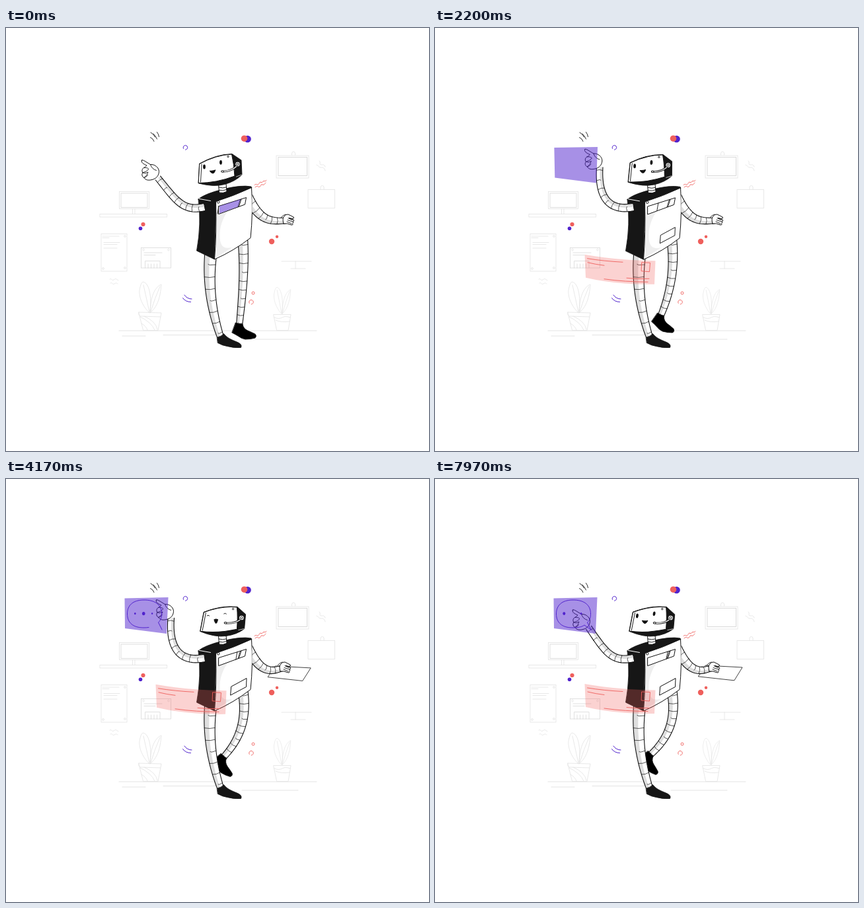
Recreate the animation shown at these times as an HTML page. Size 640 by 640 pixels, loop 8000 ms.

```html
<!DOCTYPE html>
<html lang="en">
<head>
<meta charset="utf-8">
<title>Robot</title>
<style>
  html, body { margin: 0; width: 100%; height: 100%; overflow: hidden; background: #fff; }
  svg { display: block; width: 100vw; height: 100vh; }
  path { stroke-linecap: round; stroke-linejoin: round; }
  .thin { fill: none; stroke: #111; stroke-width: .9; }
  .ink { fill: #fff; stroke: #111; }
  .dark { fill: #161616; stroke: #111; stroke-width: .8; }
  .bg { fill: none; stroke: #e3e3e3; stroke-width: .8; }
  .red { fill: none; stroke: #ef5f5c; stroke-width: .9; }
  .vio { fill: none; stroke: #5123cd; }
  .redFill { fill: #ef5f5c; }
  .vioFill { fill: #5123cd; }
</style>
</head>
<body>
<svg viewBox="0 0 640 640">
  <defs>
    <clipPath id="armClip"><rect x="372.4" y="240" width="90" height="80"/></clipPath>
  </defs>

  <g class="bg">
    <rect x="409" y="193" width="49" height="34"/>
    <rect x="412" y="195.5" width="43.5" height="28" stroke="#d2d2d2"/>
    <path d="M432.5 192v-2a2.5 3 0 0 1 5 0v2M476 244v-3a2.5 2.5 0 0 1 5 0v3"/>
    <rect x="457" y="244.5" width="40.5" height="28"/>
    <path d="M474 201c3 2-1 6 3 6s4-1 6 3M470 207c3 1 3 4 6 4s5-1 7 5"/>
    <rect x="171.5" y="247.5" width="45" height="26"/>
    <rect x="174" y="250" width="40" height="21.5" stroke="#d6d6d6"/>
    <path d="M191.5 274v7.500M195 274v7.500"/>
    <rect x="142" y="281.5" width="101.500" height="4.500"/>
    <rect x="144" y="311.5" width="39" height="56.5"/>
    <path d="M146 315h25M146 317.500h10M148 324.500h24M148 327.500h20M148 333h20"/>
    <rect x="204.5" y="332.5" width="45" height="30.5" stroke="#d9d9d9"/>
    <path d="M209 340h27M209 343.500h17M210.500 363v-10.500h22.500v10.500" stroke="#d9d9d9"/>
    <path id="bars" stroke="#d9d9d9"/>
    <g id="pins"></g>
    <path d="M157 380c3-2 3 3 6 1s3-2 7 1M158 386c3-2 3 3 6 1s3-1 5 0"/>
    <path d="M417 353h45M438 353v11M431 364h22"/>
    <path d="M171 458H470M176 466H211M238 464.500H318M357 471H442" stroke-width="1"/>
    <path id="leaves" d="M216 430c-10-10-17-26-13-38 2-9 5-10 10-4 6 8 7 28 5 42M218 431c0-16 4-38 17-43-1 12-3 32-17 43M208 389q5 22 9 41M233 391q-8 18-14 38"/>
    <use href="#leaves" transform="translate(251 62) scale(.765 .86)"/>
    <path d="M201 430l34 1-5 26.500h-22zM201 430q-1 4 2 6l31 1M203 437q17 8 22 20M209 436q18 8 20 20M205 447q7 4 9 10"/>
    <path d="M405 433.500h26l-4 24h-17zM406 438q7 3 12 0t12 0M408 442q8 4 21 2"/>
  </g>

  <path class="thin" d="M219 158q5 3 6.500 7M218.500 165.500q4 1.500 5.500 6M223 160q4 4 5.500 8M228.500 157.500q2.500 3 3 7"/>
  <circle class="vioFill" cx="365.500" cy="168" r="5.300"/>
  <circle class="redFill" cx="360.500" cy="167.200" r="4.800"/>
  <circle class="redFill" cx="402" cy="323" r="4.200"/>
  <circle class="redFill" cx="410" cy="315.800" r="2.200"/>
  <circle class="redFill" cx="207.500" cy="297" r="3.100"/>
  <circle class="vioFill" cx="203.500" cy="303.200" r="2.800"/>
  <path class="vio" d="M268.500 182.500a3.300 3.300 0 1 1 3 1.700M270 404q4 6 11 6M267.500 408.500q4 6 12 6"/>
  <path class="red" d="M376 237.500c3-3 4 1 6-1s1-4 4-3 2-2 4-2 2 1 4-1M377 241c4-4 4 1 7-1s1-4 4-3 3-1 5-3"/>
  <circle class="red" cx="374" cy="401" r="2"/>
  <path class="red" d="M368.200 416.500a3.300 3.300 0 1 1 3 1.500"/>

  <g id="backLeg"></g>
  <path id="backFoot" class="dark" style="fill:#000" d="M347.500 446q6 2 10.500 2 1 7 8 10 5 2 11 5 3 3 0 6-7 2-15 2-6-1-11-5-5-3-9-5z"/>
  <g id="frontLeg"></g>
  <path class="dark" d="M319.500 468q6-1 10-5.500c6 8 15 10 23 14q5 3 3 7-10 1-21-2-7-1-14-5z"/>

  <g id="body">
    <path class="dark" d="M291 259Q300 251 328 244T371 240L372 242 318 263 315.500 350 288.500 337Q296 296 291 259z"/>
    <path class="ink" d="M317.500 262.500Q345 254 371.500 241.500 374 280 370 317.500 345 337 315.500 350 319 310 317.500 262.500z"/>
    <path fill="#eee" d="M318.500 270L343 268C330 282 324 296 323.500 312 323 330 329 335 342 332L317 348Q320 310 318.500 270z"/>
    <path d="M292.500 258.500l17 3" stroke="#fff" fill="none"/>
    <circle class="ink" cx="321.200" cy="263.300" r="1.800"/>
    <path class="ink" d="M322 269.500L363.500 256.500 361.500 267 322 281.500z"/>
    <path class="thin" d="M356 259l-3.500 11M354.500 259.500l-3.500 11"/>
    <path id="shutter" class="thin"/>
    <path id="slot" class="ink"/>
    <path class="ink" d="M321.500 236l1 13q6 1.500 11.500-1.500l-1-12z"/>
    <path class="thin" d="M322 241q6 2 11.500 0M322.500 245.500q6 1.500 11-1"/>
  </g>

  <path id="paper" class="ink" style="stroke-width:.8"/>
  <g id="rightArm" clip-path="url(#armClip)"></g>
  <g id="rightHand">
    <path class="ink" d="M420 296q-2-7 0-10 3-5 7-4l8 4q2 2-2 2.500l-5-1 7 2.500q2 2-1 2.500 2 2-.5 3 1.500 2.500-1.500 2.500-6-3-12-2z"/>
    <path class="thin" d="M416 287q3-4 7-5M427 287.500l6 3M426 290.500l7.500 2.500M425 293l7 3"/>
  </g>

  <g id="leftArm"></g>
  <g id="leftHand">
    <path class="ink" d="M205.500 200C207 198.500 212 203 218.500 206.500 225 206 231.500 211 231.500 217.500 231 224 227 228 221 229.500 215 231 211 230 209 226.500 205.500 225 205 221 207 219 205 216 206 213 208.500 211.500 211 210.500 212 209 213 208 208 206 203.500 203 205.500 200z"/>
    <path class="thin" d="M218.500 206.500q2 7 9 9M208.500 211.500q5-1 7.500 2-3 4-9 5.500M207 219q4 2 8-1-1 5-6 8.500M209 226.500q4-1 5.500-4"/>
  </g>

  <g id="head">
    <path class="dark" d="M293 205Q318 191 342 190.500L356 200 357 222Q347 232 331 236.500 315 241 291.500 235z"/>
    <path class="ink" d="M293 205.500Q318 192 341.500 191 345 206 346 224 318 234.500 291.500 234.500z"/>
    <path class="thin" d="M296 206l-1.500 27"/>
    <path d="M348.500 225l8-3" stroke="#fff" fill="none" stroke-width=".7"/>
    <circle class="thin" cx="336" cy="194.500" r="1.200"/>
    <circle class="ink" cx="350.500" cy="206" r="3.800"/>
    <circle class="thin" cx="350.500" cy="206" r="1.700"/>
    <path id="mic" d="M348.500 209.500Q342 216 329 217.200" fill="none" stroke="#111" stroke-width="2.800"/>
    <path d="M348.500 209.500Q342 216 329 217.200" fill="none" stroke="#fff" stroke-width="1.300"/>
    <ellipse class="ink" cx="327.500" cy="217" rx="1.900" ry="1.300"/>
    <g id="eyes"></g>
    <path id="lids" class="thin" d="M298.300 210q1.700-2 3.600-.3M323.300 203.600q1.700-2 3.600-.3"/>
    <path id="mouth" fill="#111" stroke="#111"/>
  </g>

  <path id="screen" class="vioFill" fill-opacity=".5"/>
  <path id="bubble" class="vio" pathLength="100" d="M236 228L230.500 217C235 213 235.500 208 235.500 204 235.500 190 225 183 209 183 191 183 183.500 192 183.500 204 183.500 218 193 225 208 225 216 225 222 224 226 221z"/>
  <g id="dots"></g>

  <g id="banner">
    <path class="redFill" fill-opacity=".28" d="M226.500 310Q278 319 333.500 319.500L332 355Q275 356 228 345z"/>
    <path class="red" d="M230.500 316Q255 320 284 321.500M231 322Q243 325 256 326.500M256 347Q288 351.500 322 351.500M290 345.500Q306 347.500 324 346.500M313 322l12.500.5-1 13.500-12-1z"/>
  </g>
</svg>
<script>
const LOOP = 8;
const $ = id => document.getElementById(id);
const set = (node, name, value) => node.setAttribute(name, value);
const show = (id, on) => set($(id), "visibility", on ? "visible" : "hidden");
const span = (t, a, b) => Math.max(0, Math.min(1, (t - a) / (b - a)));
const ease = u => u < .5 ? 4 * u ** 3 : 1 - 4 * (1 - u) ** 3;
const soft = u => .5 - .5 * Math.cos(Math.PI * u);
const out = (u, power) => 1 - (1 - u) ** power;
const pulse = (t, a, b, c, d) => soft(span(t, a, b)) - soft(span(t, c, d));
const mix = (a, b, k) => a.map((v, i) => v + (b[i] - v) * k);
const bend = (a, b, c, k) => mix(mix(a, b, k), mix(b, c, k), k);
const line = pts => "M" + pts.map(p => p.map(n => n.toFixed(2)).join(" ")).join("L");
const quad = q => "M" + q.join(" ") + "Z";
const times = (n, fn) => Array.from({ length: n }, (_, i) => fn(i));

function child(parent, tag, attrs) {
  const node = document.createElementNS("http://www.w3.org/2000/svg", tag);
  for (const k in attrs) set(node, k, attrs[k]);
  return parent.appendChild(node);
}

// Ringed limb along a cubic curve; returns its redraw function.
function limb(id, w0, w1, rings) {
  const g = $(id);
  const fill = child(g, "path", { fill: "#fff" });
  const shade = child(g, "path", { fill: "#dedede" });
  const edge = child(g, "path", { class: "thin", style: "stroke-width:1.1" });
  const ring = child(g, "path", { class: "thin", style: "stroke-width:.7" });
  return c => {
    // Point at u, side from -1 to 1 across the limb, push along it
    const at = (u, side, push = 0) => {
      const v = 1 - u;
      const pos = [0, 1].map(k => v ** 3 * c[k] + 3 * v * v * u * c[k + 2] + 3 * v * u * u * c[k + 4] + u ** 3 * c[k + 6]);
      const dir = [0, 1].map(k => v * v * (c[k + 2] - c[k]) + 2 * v * u * (c[k + 4] - c[k + 2]) + u * u * (c[k + 6] - c[k + 4]));
      const len = Math.hypot(...dir), [dx, dy] = dir.map(d => d / len);
      const w = (w0 + (w1 - w0) * u) / 2 * side;
      return [pos[0] - dy * w + dx * push, pos[1] + dx * w + dy * push];
    };
    const side = s => times(25, i => at(i / 24, s));
    const a = side(1), b = side(-1);
    set(fill, "d", line([...a, ...side(-1).reverse()]) + "Z");
    set(shade, "d", line([...a, ...side(.1).reverse()]) + "Z");
    set(edge, "d", line(a) + line(b));
    set(ring, "d", times(rings, i => {
      const u = (i + .7) / rings;
      return line([at(u, i % 3 ? 1 : .3), at(u, 0, 1), at(u, -1)]);
    }).join(""));
  };
}

// Small repeated parts
set($("bars"), "d", times(4, i => `M${215 + 4.5 * i} 357v6`).join(""));
[[180, 315], [147, 364], [180, 363], [208, 335.5], [246, 335.5]]
  .forEach(([cx, cy]) => child($("pins"), "circle", { cx, cy, r: 1.4 }));
const eyes = times(2, i => child($("eyes"), "ellipse", { cx: 300 + 25 * i, cy: 210 - 6.7 * i, rx: 1.9, fill: "#111" }));
const dots = times(3, i => child($("dots"), "ellipse", { cx: 195.3 + 12.9 * i, cy: 203.6, class: "vioFill" }));

const leftArm = limb("leftArm", 11.5, 9.5, 8);
const rightArm = limb("rightArm", 15, 8.5, 7);
const backLeg = limb("backLeg", 15, 9, 10);
limb("frontLeg", 18, 10, 7)([309.5, 344, 305, 390, 312, 430, 324, 466]);

// Mouth: half width, upper curve, lower curve, drop
const smile = [4.2, 1, 8.5, 0], laugh = [2.8, -1.5, 11, -1.5], flat = [4, 0, .2, -1.5];

function draw(t) {
  // Pointing arm
  const lift = ease(span(t, .5, 2.6)), lower = ease(span(t, 4.3, 5.8));
  const [hx, hy] = mix(mix([0, 0], [22, -17], lift), [3, -2], lower);
  const up = lift - lower;
  leftArm([300, 271, 268 - 6 * up, 278, 258 - 12 * up, 262 - 7 * up, 230 + hx * .9, 227 + hy]);
  set($("leftHand"), "transform", `translate(${hx} ${hy})`);

  // Lifted leg
  const rise = span(t, 0, 5), step = (rise + soft(rise)) / 2;
  const leg = mix([358, 318, 362, 365, 357, 410, 353, 450], [358, 318, 366, 362, 354, 392, 325, 418], step);
  backLeg(leg);
  set($("backFoot"), "transform",
    `translate(${leg[6] - 353} ${leg[7] - 450}) rotate(${35 * step} 353 450)`);

  // Resting arm and the sheet sliding out of the chest
  const rest = ease(span(t, 2, 4));
  rightArm([366, 256, 384, 291, 398, 293, 423 - 6 * rest, 291.5 - 5 * rest]);
  set($("rightHand"), "transform", `translate(${-5 * rest} ${-5 * rest})`);
  const slide = out(span(t, 2.55, 4.95), 3);
  set($("paper"), "d", quad(mix([335, 324, 362, 310, 353, 311, 333, 323], [398.5, 298.5, 409, 282, 465, 285, 453, 304.5], slide)));
  show("paper", slide > 0);

  // Body
  const tilt = soft(span(t, .5, 4.6));
  set($("body"), "transform", `translate(0 ${tilt})`);
  const door = 30 * out(span(t, .4, 4.97), 1.5);
  set($("shutter"), "d", `M${322 + door} ${269.5 - door * .313}l-2 11.500`);
  const open = out(span(t, .9, 2.6), 2);
  set($("slot"), "d", "M341 313L364 300.500 363.500 313.500 340 326z");
  set($("slot"), "transform", `translate(352 313) scale(${open}) translate(-352 -313)`);
  show("slot", open > 0);

  // Head
  set($("head"), "transform", `translate(${5 * tilt} ${.3 * tilt}) rotate(${8 * tilt} 324 215)`);
  const shut = t > 3.45 && t < 6.2;
  show("eyes", !shut);
  show("lids", shut);
  eyes.forEach(e => set(e, "ry", 3.4 - 2.2 * pulse(t, 3.2, 3.45, 6.4, 6.85)));
  const laughing = mix(smile, laugh, pulse(t, 3.2, 3.6, 5.9, 6.4));
  const [w, a, b, dy] = mix(laughing, flat, pulse(t, 5.9, 6.35, 6.5, 6.95));
  set($("mouth"), "d", `M${-w} 0Q0 ${a} ${w} 0Q0 ${b} ${-w} 0z`);
  set($("mouth"), "transform", `translate(312.6 ${215.5 + dy}) rotate(-9)`);

  // Screen flying from the chest, then the speech bubble
  set($("screen"), "d", quad(bend(
    [323, 269.5, 355, 259, 351, 270.5, 323, 280.5],
    [244, 226, 285, 255, 316, 273, 276, 260],
    [179.5, 180.5, 245.5, 179, 243, 234, 180, 226], ease(span(t, 0, 2.5)))));
  const drawn = 100 * span(t, 2.72, 4.4);
  set($("bubble"), "stroke-dasharray", `${drawn} 200`);
  show("bubble", drawn > 0);
  dots.forEach((dot, i) => {
    const since = t - 3.5 - .7 * i, beat = Math.max(0, Math.round(since / 2.4));
    const r = 2.7 * Math.cos(Math.PI / 2 * Math.min(1, Math.abs(since - 2.4 * beat) / 1.1));
    set(dot, "rx", r * .85);
    set(dot, "ry", r);
  });

  // Rising banner
  set($("banner"), "transform", `translate(0 ${146 - 146 * out(span(t, .72, 5.47), 4)})`);
  set($("banner"), "opacity", span(t, .65, 1.15));
}

function frame(now) {
  draw(now / 1000 % LOOP);
  requestAnimationFrame(frame);
}
draw(0);
requestAnimationFrame(frame);
</script>
</body>
</html>
```
